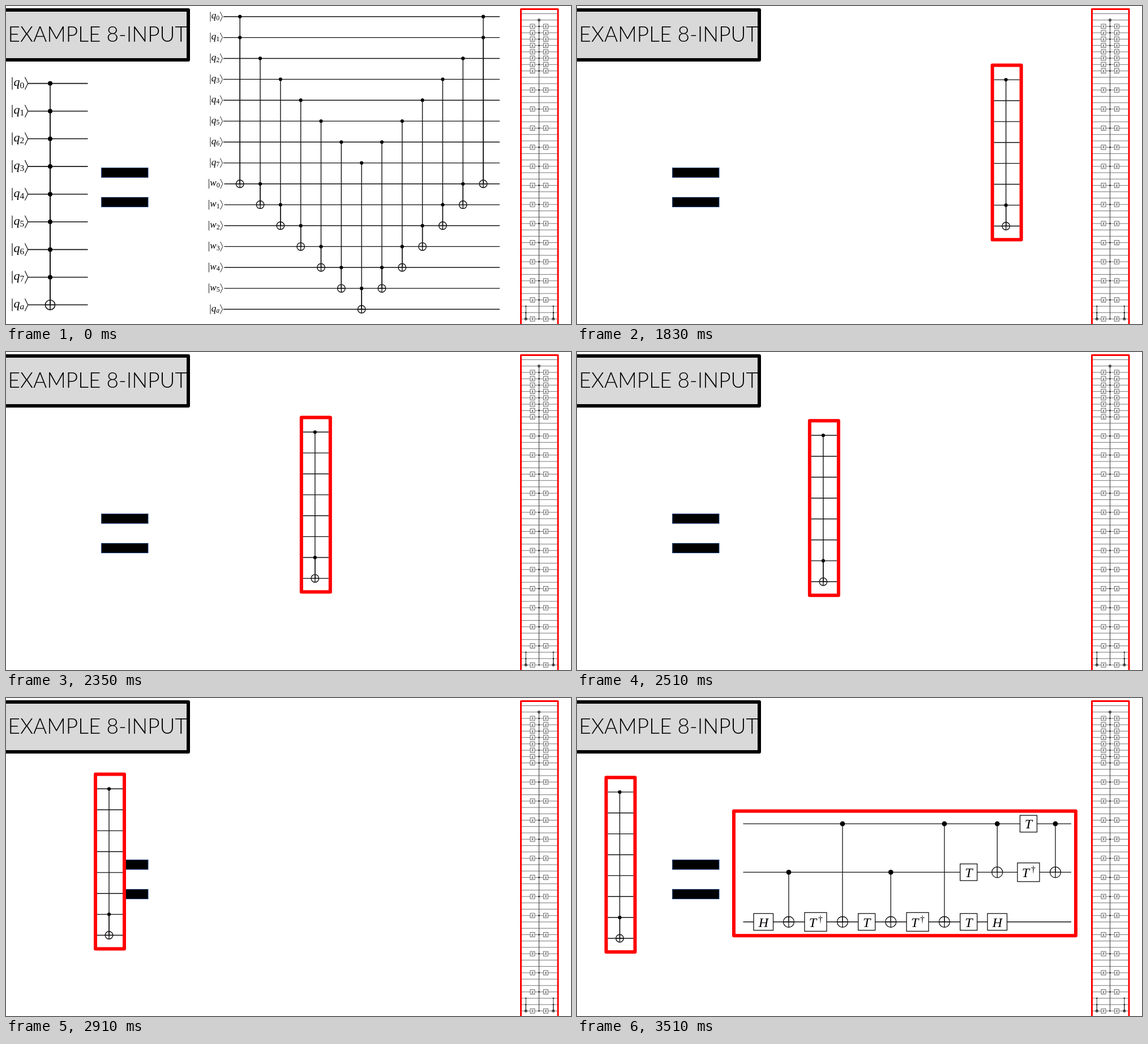
These frames come from a looping animation (998x561 px, 5020 ms). An HTML page with a canvas:

```html
<!DOCTYPE html>
<html lang="en">
<head>
<meta charset="utf-8">
<title>Example 8-input</title>
<style>
html, body { margin: 0; width: 100%; height: 100%; overflow: hidden; background: #fff; }
canvas { display: block; }
</style>
</head>
<body>
<canvas id="stage" width="998" height="561"></canvas>
<script>
const ctx = document.getElementById('stage').getContext('2d');
const LOOP = 5020, MOVE_START = 1550, MOVE_END = 3510, TICK = 40;
const SERIF = '"Liberation Serif", serif';
const INK = '#111', RED = '#ff0000';

function line(x1, y1, x2, y2, width, color = INK) {
  ctx.strokeStyle = color;
  ctx.lineWidth = width;
  ctx.beginPath();
  ctx.moveTo(x1, y1);
  ctx.lineTo(x2, y2);
  ctx.stroke();
}

function dot(x, y, r) {
  ctx.fillStyle = '#000';
  ctx.beginPath();
  ctx.arc(x, y, r, 0, Math.PI * 2);
  ctx.fill();
}

function plusRing(x, y, r, width) {
  line(x - r, y, x + r, y, width);
  line(x, y - r, x, y + r, width);
  ctx.beginPath();
  ctx.arc(x, y, r, 0, Math.PI * 2);
  ctx.stroke();
}

// Each control runs its own wire to the ring, so shared stretches look heavier.
function controlled(x, controls, ringY, dotR, ringR, width) {
  for (const y of controls) {
    line(x, y, x, ringY, width);
    dot(x, y, dotR);
  }
  plusRing(x, ringY, ringR, width);
}

function box(x, y, w, h, width, color, fill) {
  ctx.fillStyle = fill;
  ctx.fillRect(x, y, w, h);
  ctx.strokeStyle = color;
  ctx.lineWidth = width;
  ctx.lineJoin = width > 2 ? 'round' : 'miter';
  ctx.strokeRect(x, y, w, h);
}

function text(str, x, y, font, align = 'left') {
  ctx.fillStyle = '#000';
  ctx.font = font;
  ctx.textAlign = align;
  ctx.fillText(str, x, y);
}

function ket(x, y, size, name, sub) {
  const half = size * 0.5, width = size * 0.055;
  line(x, y - half, x, y + half, width);
  text(name, x + size * 0.11, y + size * 0.22, `italic ${size}px ${SERIF}`);
  const subX = x + size * 0.11 + ctx.measureText(name).width;
  const style = sub === 'a' ? 'italic ' : '';
  text(sub, subX, y + size * 0.36, `${style}${size * 0.7}px ${SERIF}`);
  const angleX = subX + size * 0.41;
  ctx.lineWidth = width;
  ctx.beginPath();
  ctx.moveTo(angleX, y - half);
  ctx.lineTo(angleX + size * 0.24, y);
  ctx.lineTo(angleX, y + half);
  ctx.stroke();
}

function title() {
  box(-12, 7, 334, 88, 6, '#000', '#d9d9d9');
  text('EXAMPLE 8-INPUT', 3.5, 63, '300 37px Lato, "Open Sans", sans-serif');
}

function equals() {
  for (const y of [285.5, 337.5]) box(168.5, y, 82.5, 17, 1, '#2f528f', '#000');
}

function strip() {
  const rowY = i => 13.55 + 11.22 * i;
  const mid = 941.5;
  box(909.5, 5.5, 65.5, 570, 3, RED, '#fff');
  for (let i = 0; i < 49; i++) line(911, rowY(i), 973.5, rowY(i), 0.8, '#555');
  line(mid, rowY(1), mid, rowY(48), 1, '#333');
  plusRing(mid, rowY(1), 2.2, 0.8);
  for (let i = 2; i < 49; i += i < 9 ? 1 : 3) {
    const y = rowY(i);
    for (const x of [930, 953.3]) {
      box(x - 4, y - 4, 8, 8, 0.8, '#444', '#fff');
      text('X', x, y + 2.3, `italic 7px ${SERIF}`, 'center');
    }
    dot(mid, y, 1.2);
  }
  for (const x of [918.3, 966.8]) {
    controlled(x, [rowY(46), rowY(47)], rowY(48), 1.1, 2.2, 0.8);
  }
}

function compactCircuit() {
  const rowY = i => 136.6 + 48.84 * i;
  const controls = [];
  for (let i = 0; i < 9; i++) {
    const y = rowY(i);
    line(39, y, 144.5, y, 1.6);
    ket(11, y, 22, 'q', i < 8 ? String(i) : 'a');
    if (i < 8) controls.push(y);
  }
  controlled(78, controls, rowY(8), 4, 8.6, 1.6);
}

function expandedCircuit() {
  const rowY = i => 18.7 + 36.88 * i;
  for (let i = 0; i < 15; i++) {
    const work = i > 7 && i < 14;
    const sub = i === 14 ? 'a' : String(work ? i - 8 : i);
    line(work ? 385.5 : 384, rowY(i), 872, rowY(i), 1.4);
    ket(work ? 358.5 : 361, rowY(i), 17, work ? 'w' : 'q', sub);
  }
  for (let c = 0; c < 13; c++) {
    const depth = 6 - Math.abs(c - 6);
    const second = depth ? depth + 7 : 0;
    controlled(413.2 + 35.82 * c, [rowY(depth + 1), rowY(second)],
      rowY(depth + 8), 3.1, 6.8, 1.4);
  }
}

function gateSlice(p) {
  ctx.save();
  ctx.translate(-696 * p, 36.5 * p);
  box(747.5, 103.7, 51, 307.8, 6, RED, '#fff');
  const rowY = i => 129.4 + 36.88 * i;
  for (let i = 0; i < 8; i++) line(750.5, rowY(i), 795.5, rowY(i), 1.4);
  controlled(771.5, [rowY(0), rowY(6)], rowY(7), 3.1, 6.8, 1.4);
  ctx.restore();
}

function gate(x, y, name) {
  const dagger = name === 'T†';
  const w = dagger ? 39 : name === 'H' ? 34.5 : 30;
  const h = dagger ? 33 : 29.5;
  box(x - w / 2, y - h / 2, w, h, 1.3, INK, '#fff');
  const font = `italic 24px ${SERIF}`;
  text(name[0], dagger ? x - 5 : x, y + 8.5, font, 'center');
  if (dagger) text('†', x + 8.5, y + 1, `16px ${SERIF}`, 'center');
}

function decomposition() {
  const [a, b, c] = [221.8, 307.4, 395];
  box(277, 199.5, 604, 219.7, 6, RED, '#fff');
  for (const y of [a, b, c]) line(293.5, y, 873, y, 1.3);
  const cnots = [[374, b, c], [469, a, c], [554.3, b, c], [649, a, c],
    [742.3, a, b], [845, a, b]];
  for (const [x, from, to] of cnots) controlled(x, [from], to, 4.4, 9.5, 1.3);
  const gates = [[329.3, c, 'H'], [421.5, c, 'T†'], [511.7, c, 'T'],
    [601.6, c, 'T†'], [691.8, c, 'T'], [742.3, c, 'H'],
    [691.8, b, 'T'], [797.5, b, 'T†'], [797.5, a, 'T']];
  for (const g of gates) gate(...g);
}

// Symmetric slow-fast-slow curve, a little sharper towards both ends.
function ease(t) {
  if (t <= 0) return 0;
  if (t >= 1) return 1;
  const k = 2.01 + 0.37 * (2 * t - 1) ** 2;
  const u = t ** k;
  return u / (u + (1 - t) ** k);
}

function draw(time) {
  ctx.fillStyle = '#fff';
  ctx.fillRect(0, 0, 998, 561);
  title();
  equals();
  strip();
  if (time < MOVE_START) {
    compactCircuit();
    expandedCircuit();
    return;
  }
  const steps = (MOVE_END - MOVE_START) / TICK;
  const step = Math.floor((time - MOVE_START) / TICK);
  gateSlice(ease((step + 0.1) / steps));
  if (time >= MOVE_END) decomposition();
}

const start = performance.now();
function loop() {
  draw((performance.now() - start) % LOOP);
  requestAnimationFrame(loop);
}
loop();
</script>
</body>
</html>
```
